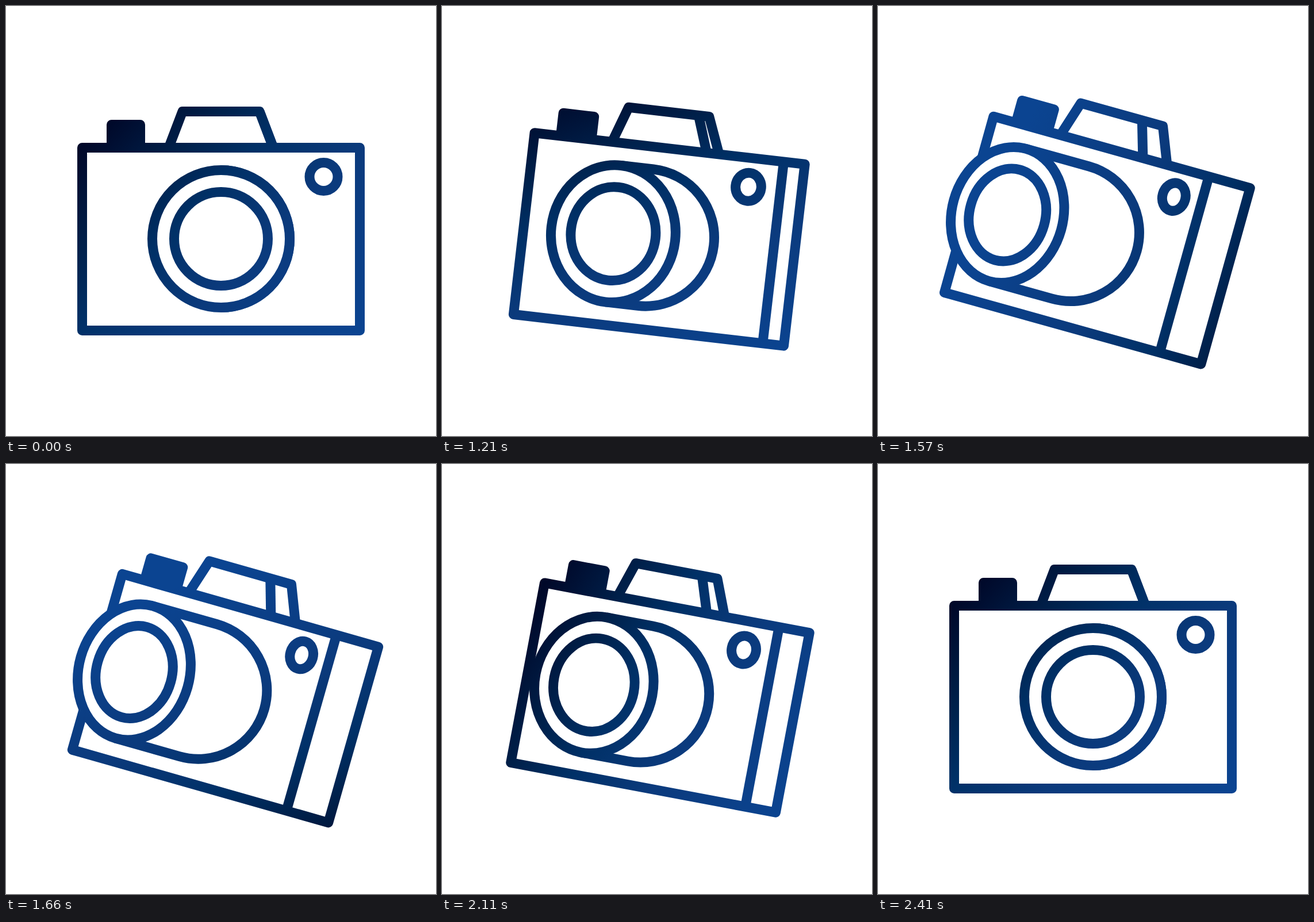
Recreate the animation shown at these times as an HTML page. Size 748 by 748 pixels, loop 2500 ms.

```html
<!DOCTYPE html>
<html lang="en">
<head>
<meta charset="utf-8">
<title>Camera</title>
<style>
  html, body { margin: 0; width: 100%; height: 100%; overflow: hidden; background: #fff; }
  svg { display: block; width: 100vw; height: 100vh; }
  #camera { fill: #fff; stroke: url(#ink); stroke-width: 17; stroke-linejoin: round; }
  #camera .open { fill: none; }
  #camera #button { fill: url(#ink); }
</style>
</head>
<body>
<svg viewBox="0 0 748 748">
  <defs>
    <linearGradient id="ink" gradientUnits="userSpaceOnUse" x1="-325" y1="0" x2="245" y2="0">
      <stop offset="0" stop-color="#000829"/>
      <stop offset=".21" stop-color="#00204a"/>
      <stop offset=".37" stop-color="#003066"/>
      <stop offset=".6" stop-color="#0b3a7c"/>
      <stop offset="1" stop-color="#0b4491"/>
    </linearGradient>
  </defs>
  <g id="camera">
    <path id="button"/>
    <path id="hump"/>
    <path id="humpEdge" class="open"/>
    <path id="body"/>
    <path id="bodyEdge" class="open"/>
    <ellipse id="finder" cy="-108.5" ry="24.5"/>
    <path id="barrel"/>
    <ellipse id="rim" cy="-.5" ry="119.5"/>
    <ellipse id="glass" cy="-.5" ry="81.5"/>
  </g>
</svg>
<script>
  const LOOP = 2500, STEP = 30, PHASE = 10;
  const START = 1000, TURN = 1080, PEAK = 1690, MIRROR = 1700;
  const WINDUP = -2.2, TILT = 15.9;

  const $ = id => document.getElementById(id);
  const clamp = v => Math.min(1, Math.max(0, v));
  const span = (t, a, b) => clamp((t - a) / (b - a));
  const quad = u => u < .5 ? 2 * u * u : 1 - 2 * (1 - u) ** 2;

  // Bezier easing with flat ends, solved by bisection
  const bezier = (x1, x2) => u => {
    let lo = 0, hi = 1, s = .5;
    for (let i = 0; i < 24; i++) {
      s = (lo + hi) / 2;
      const r = 1 - s;
      if (3 * r * r * s * x1 + 3 * r * s * s * x2 + s ** 3 < u) lo = s; else hi = s;
    }
    return u <= 0 ? 0 : u >= 1 ? 1 : s * s * (3 - 2 * s);
  };
  const turnEase = bezier(.17, .08);
  const spinEase = bezier(.4, .5);

  const set = (id, attrs) => {
    for (const key in attrs) $(id).setAttribute(key, attrs[key]);
  };
  const line = (id, points, end = '') => set(id, { d: 'M' + points.join('L') + end });

  function draw(time) {
    const t = Math.floor((time - PHASE) / STEP) * STEP + PHASE;
    const m = t < MIRROR ? t : 2 * MIRROR - t; // the way back mirrors the way out
    const q = turnEase(span(m, TURN, PEAK));
    const angle = WINDUP * quad(span(m, START, TURN)) + (TILT - WINDUP) * q;
    const spin = 45 + 360 * spinEase(span(t, START, 2 * MIRROR - START));

    set('camera', { transform: `translate(374 405.5) rotate(${angle})` });
    set('ink', { gradientTransform: `translate(60 0) rotate(${spin})` });

    const left = -241.5 + 17.8 * q, right = 241.5 - 2.2 * q, edge = 241.5 - 78 * q;
    const top = -159, bottom = 159;
    line('body', [[left, top], [right, top], [right, bottom], [left, bottom]], 'Z');
    line('bodyEdge', [[edge, top], [edge, bottom]]);

    const b0 = -190.5 + 7 * q, b1 = -140.5 + 15 * q;
    line('button', [[b0, top], [b0, -199], [b1, -199], [b1, top]], 'Z');

    line('hump', [
      [-91 - 12.6 * q, top], [-67 - 17.2 * q, -222],
      [67 - 2.8 * q, -222], [91 - 1.6 * q, top]
    ]);
    line('humpEdge', [[67 - 41 * q, -222], [91 - 46 * q, top]]);

    set('finder', { cx: 178.5 - 63.7 * q, rx: 24.5 - 4.5 * q });

    const front = -157.3 * q, base = -41.4 * q, squash = 1 - .1925 * q;
    set('barrel', {
      d: `M${front} -120H${base}A119.5 119.5 0 0 1 ${base} 119H${front}`
    });
    set('rim', { cx: front, rx: 119.5 * squash });
    set('glass', { cx: front, rx: 81.5 * squash });
  }

  const begin = performance.now();
  function tick() {
    draw((performance.now() - begin) % LOOP);
    requestAnimationFrame(tick);
  }
  draw(0);
  requestAnimationFrame(tick);
</script>
</body>
</html>
```
